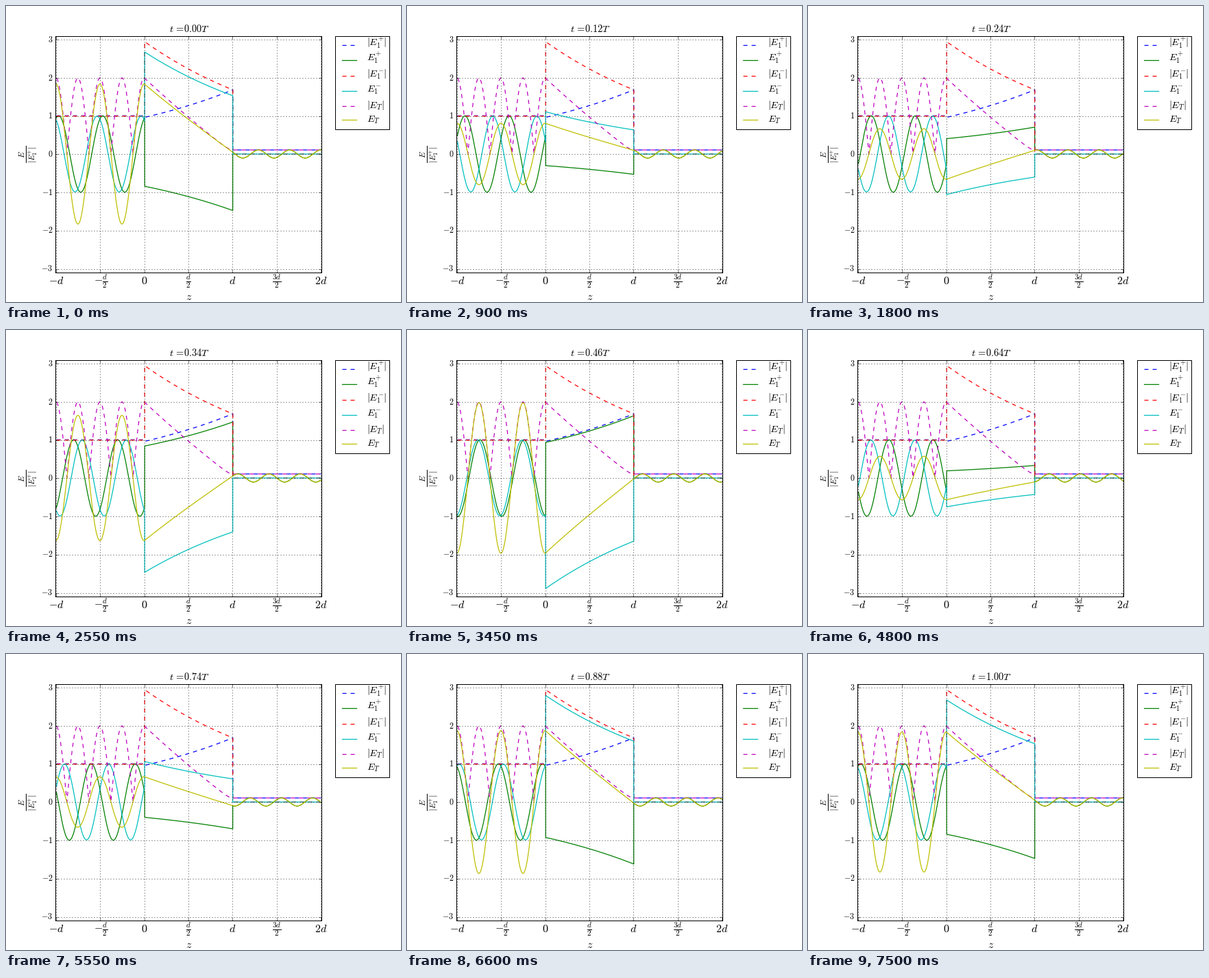
A matplotlib script for the animation above (7650 ms loop, 576 by 432 pixels).

```python
import numpy as np
import matplotlib.pyplot as plt
from matplotlib.animation import FuncAnimation
from matplotlib.transforms import Affine2D

WIDTH, HEIGHT, DPI = 576, 432, 72
FRAMES, INTERVAL = 51, 150
LINE_WIDTH = 1.25
NUDGE = 0.4  # makes the frame and grid snap to the pixel below

plt.style.use("classic")
plt.rcParams.update({"savefig.dpi": "figure", "mathtext.fontset": "cm"})


def layer_fields():
    """Complex forward and backward waves around a layer 0 < z < 1 (units of d)."""
    k1, k3, alpha = 4 * np.pi, 4 * np.pi * np.sqrt(2), 0.56
    before, inside, after = (np.linspace(a, a + 1, 3000) for a in (-1, 0, 1))

    # Start from a unit transmitted wave and match value and slope backwards.
    grow = (1 - 1j * k3 / alpha) / 2 * np.exp(-alpha)
    decay = (1 + 1j * k3 / alpha) / 2 * np.exp(alpha)
    value, slope = grow + decay, alpha * (grow - decay)
    incident = (value + 1j * slope / k1) / 2
    reflected = (value - 1j * slope / k1) / 2

    forward = np.concatenate([incident * np.exp(-1j * k1 * before),
                              grow * np.exp(alpha * inside),
                              np.exp(-1j * k3 * (after - 1))])
    backward = np.concatenate([reflected * np.exp(1j * k1 * before),
                               decay * np.exp(-alpha * inside),
                               0 * after])
    scale = np.exp(1j * np.pi / 10) / incident
    return np.concatenate([before, inside, after]), forward * scale, backward * scale


fig = plt.figure(figsize=(WIDTH / DPI, HEIGHT / DPI), dpi=DPI, facecolor="white")
ax = fig.add_axes([0.125 - NUDGE / WIDTH, 0.1 - NUDGE / HEIGHT, 0.675, 0.8])
ax.set_xlim(-1.0125, 2.0125)
ax.set_ylim(-3.1, 3.1)
ax.set_xticks(np.arange(-1, 2.1, 0.5))
ax.set_yticks(range(-3, 4))
ax.tick_params(labelbottom=False, labelleft=False)
ax.grid(True, linewidth=0.75)
curve_space = ax.transData + Affine2D().translate(NUDGE, NUDGE)

# Overlay in pixel coordinates for labels and the legend.
page = fig.add_axes([0, 0, 1, 1])
page.set_xlim(0, WIDTH)
page.set_ylim(HEIGHT, 0)
page.axis("off")


def label(x, y, text, size, **options):
    return page.text(x, y, text, fontsize=size, **{"va": "baseline", **options})


x_names = ["-d", r"-\frac{d}{2}", "0", r"\frac{d}{2}", "d", r"\frac{3d}{2}", "2d"]
for i, name in enumerate(x_names):
    label(73.7 + 64.2 * i, 405.5, f"${name}$", 16, ha="center")
for value in range(-3, 4):
    label(68.3, 220 - 55.74 * value, f"${value}$", 12, ha="right")
label(267, 429, "$z$", 16, ha="center")
label(33, 216, r"$\frac{E}{|E_1^{+}|}$", 16.5, ha="center", va="center", rotation=90)
title = label(267.5, 38.3, "", 14.4, ha="center")

z, forward, backward = layer_fields()
waves = [("E_1^{+}", forward, "bg"), ("E_1^{-}", backward, "rc"),
         ("E_T", forward + backward, "my")]
page.add_patch(plt.Rectangle((480.3, 43.6), 79, 136, fc="white", ec="black", lw=1))
legend_rows = iter([(57, 58), (79, 80.5), (101.5, 103),
                    (124, 125.5), (146, 149), (166, 169.5)])


def add_curve(values, name, color, style):
    line, = ax.plot(z, values, style, color=color, lw=LINE_WIDTH,
                    transform=curve_space)
    handle_y, text_y = next(legend_rows)
    page.plot([490.3, 510.5], [handle_y] * 2, style, color=color, lw=LINE_WIDTH)
    label(526.3, text_y, f"${name}$", 14.4)
    return line


moving = []
for name, wave, (dashed, solid) in waves:
    add_curve(abs(wave), f"|{name}|", dashed, "--")
    moving.append((add_curve(wave.real, name, solid, "-"), wave))


def update(frame):
    t = frame / (FRAMES - 1)
    for line, wave in moving:
        line.set_ydata((wave * np.exp(2j * np.pi * t)).real)
    title.set_text(rf"$t\,=\!\mathbf{{{t:.2f}}}T$")
    return [line for line, _ in moving] + [title]


# Plotting may have rescaled the view, so fix it again.
ax.set_xlim(-1.0125, 2.0125)
ax.set_ylim(-3.1, 3.1)
page.set_xlim(0, WIDTH)
page.set_ylim(HEIGHT, 0)

anim = FuncAnimation(fig, update, frames=FRAMES, interval=INTERVAL,
                     repeat=True, repeat_delay=0, blit=False)
plt.show()
```
